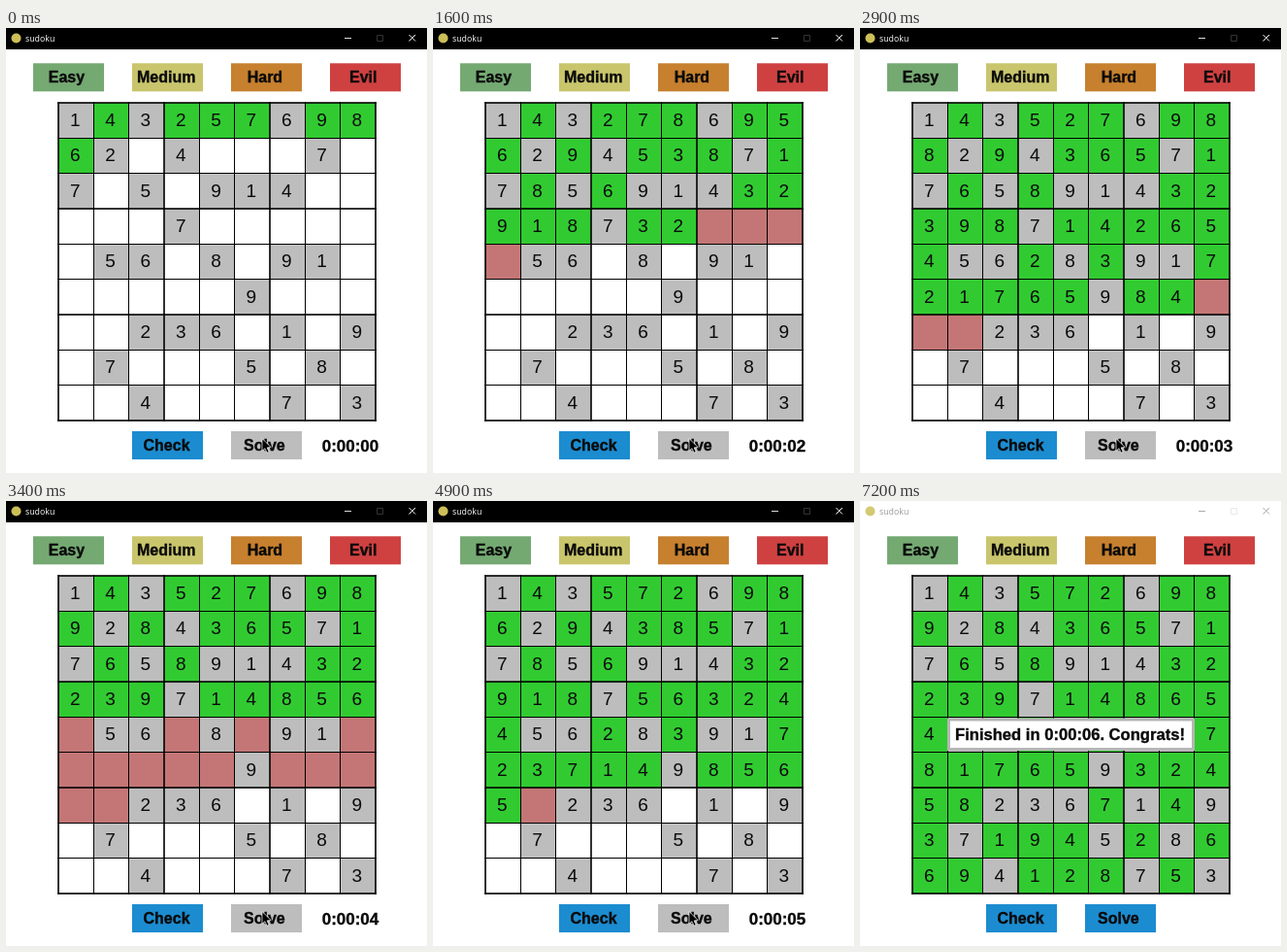
These frames come from a looping animation (434 px wide and 458 px high, 7.3 s). An HTML page:

```html
<!DOCTYPE html>
<html lang="en">
<head>
<meta charset="utf-8">
<title>sudoku</title>
<style>
  html, body { margin: 0; width: 100%; height: 100%; overflow: hidden; background: #fff; }
  svg { display: block; width: 434px; height: 458px; }
  text { font-family: "Liberation Sans", Arial, sans-serif; fill: #0a0a0a; }
  .bold { font-weight: bold; font-size: 16px; stroke: #0a0a0a; stroke-width: 0.35px; }
  .digit { font-size: 19px; text-anchor: middle; }
  .caption { font: 8.8px "Open Sans", sans-serif; }
</style>
</head>
<body>
<svg id="stage" viewBox="0 0 434 458"></svg>
<script>
const LOOP = 7300, TICK = 100, SOLVED = 6100, BLUR = 6600;
const CLOCK_LEAD = 850;
const LEFT = 54, TOP = 77, SIZE = 327, CELL = SIZE / 9;
const GREY = "#bdbdbd", GREEN = "#31cb31", RED = "#c47676", BLUE = "#1c8cd0";

const PUZZLE =
  "1.3...6.." + ".2.4...7." + "7.5.914.." +
  "...7....." + ".56.8.91." + ".....9..." +
  "..236.1.9" + ".7...5.8." + "..4...7.3";

// Backtracking solver; "-" marks a cell that was filled and then cleared.
const cells = [...PUZZLE], log = [];
const row = i => Math.floor(i / 9);
const col = i => i % 9;
const box = i => Math.floor(row(i) / 3) * 3 + Math.floor(col(i) / 3);
const sees = (a, b) => row(a) === row(b) || col(a) === col(b) || box(a) === box(b);
const fits = (i, d) => !cells.some((v, j) => v === d && sees(i, j));

function put(i, value) {
  cells[i] = value;
  log.push(cells.join(""));
}

function solve(i) {
  while (i < 81 && PUZZLE[i] !== ".") i++;
  if (i === 81) return true;
  for (const d of "123456789") {
    if (!fits(i, d)) continue;
    put(i, d);
    if (solve(i + 1)) return true;
    put(i, "-");
  }
  return false;
}
solve(0);

// Moments at which the search reaches a given position.
const CUES = [
  [0, "143257698" + "62.4"],
  [800, "143257698" + "829436571" + "765891432" + "98172----" + "-56"],
  [2200, "143527698" + "629438571" + "785691432" + "498716325" + "356284917" + "2--"],
  [3400, "143527698" + "928436571" + "765891432" + "239714856" + "-56-8-91-" + "-----9---" + "--236"],
  [4200, "143572698" + "629438571" + "785-914--"],
  [5600, "143572698" + "829436571" + "765891432" + "981743256" + "-56-8-91-" + "-----9---" + "--236"]
];
const keys = [];
let from = 0;
for (const [time, start] of CUES) {
  from = log.findIndex((s, i) => i >= from && s.startsWith(start));
  keys.push([time, from]);
}
keys.push([SOLVED, log.length - 1]);

function boardAt(t) {
  if (t >= SOLVED) return log[log.length - 1];
  const k = keys.findIndex(([time]) => time > t);
  const [t0, s0] = keys[k - 1], [t1, s1] = keys[k];
  return log[Math.round(s0 + (s1 - s0) * (t - t0) / (t1 - t0))];
}

const stage = document.getElementById("stage");
function add(tag, attrs, content = "", parent = stage) {
  const el = document.createElementNS("http://www.w3.org/2000/svg", tag);
  for (const name in attrs) el.setAttribute(name, attrs[name]);
  el.textContent = content;
  parent.appendChild(el);
  return el;
}
const rect = (x, y, width, height, fill, parent) =>
  add("rect", { x, y, width, height, fill }, "", parent);
const show = (el, on) => el.setAttribute("visibility", on ? "visible" : "hidden");

// Title bar
rect(0, 0, 434, 458, "#fff");
const bar = rect(0, 0, 434, 22, "#000");
const icon = add("circle", { cx: 10.5, cy: 10.5, r: 5, fill: "#cdbf58" });
const caption = add("text", { x: 20, y: 14, class: "caption" }, "sudoku");
const line = d => add("path", { d, fill: "none", "stroke-width": 1 });
const minimise = line("M349 10.5h7");
const maximise = line("M382.5 7.5h6v6h-6z");
const close = line("M415.5 7l6.5 6.5m0-6.5l-6.5 6.5");

function paintBar(active) {
  bar.setAttribute("fill", active ? "#000" : "#fff");
  icon.setAttribute("opacity", active ? 1 : 0.85);
  caption.style.fill = active ? "#fff" : "#999";
  minimise.setAttribute("stroke", active ? "#ddd" : "#aaa");
  maximise.setAttribute("stroke", active ? "#333" : "#e8e8e8");
  close.setAttribute("stroke", active ? "#fff" : "#aaa");
}

// Buttons
function button(x, y, fill, label, textX) {
  const face = rect(x, y, 73, 29, fill);
  add("text", { x: textX, y: y + 20, class: "bold" }, label);
  return face;
}
button(28, 36.3, "#74a972", "Easy", 43.8);
button(130, 36.3, "#c9c56c", "Medium", 135);
button(232, 36.3, "#c6802e", "Hard", 248.7);
button(334, 36.3, "#cf4141", "Evil", 354);
button(130, 415, BLUE, "Check", 141.5);
const solveFace = button(232, 415, GREY, "Solve", 245);
const clock = add("text", { x: 325.7, y: 436.3, class: "bold", style: "font-size:17px" });

// Board
const faces = [], digits = [];
for (let i = 0; i < 81; i++) {
  const x = LEFT + col(i) * CELL, y = TOP + row(i) * CELL;
  faces.push(rect(x, y, CELL, CELL, "#fff"));
  digits.push(add("text", { x: x + 17.2, y: y + 24, class: "digit" }));
}
for (let n = 0; n < 10; n++) {
  const thin = n % 3 > 0, w = thin ? 1 : 1.6;
  const edge = start => thin ? Math.floor(start + n * CELL) : start + n * CELL - w / 2;
  rect(edge(LEFT), TOP - 0.8, w, SIZE + 1.6, "#000");
  rect(LEFT - 0.8, edge(TOP), SIZE + 1.6, w, "#000");
}

const cursor = add("path", {
  d: "M264 422.5v12.8l3-2.6 2 4.6 2.2-1-2-4.4 4-.4z",
  fill: "#000", stroke: "#fff", "stroke-width": 0.7
});

const notice = add("g", {});
rect(90, 223.5, 255, 33.5, "#b6b6b6", notice);
rect(93, 226.5, 249, 27.5, "#fff", notice);
add("text", { x: 98, y: 245.8, class: "bold", style: "font-size:16.6px" },
  "Finished in 0:00:06. Congrats!", notice);

function draw(t) {
  const board = boardAt(t), solved = t >= SOLVED;
  for (let i = 0; i < 81; i++) {
    const v = board[i], filled = v >= "1";
    const fill = PUZZLE[i] !== "." ? GREY : filled ? GREEN : v === "-" ? RED : "#fff";
    faces[i].setAttribute("fill", fill);
    digits[i].textContent = filled ? v : "";
  }
  clock.textContent = "0:00:0" + Math.floor((t + CLOCK_LEAD) / 1000);
  show(clock, !solved);
  show(notice, solved);
  show(cursor, t < BLUR);
  solveFace.setAttribute("fill", solved ? BLUE : GREY);
  paintBar(t < BLUR);
}

const begin = performance.now();
let shown = -1;
function frame() {
  const t = Math.floor(((performance.now() - begin) % LOOP) / TICK) * TICK;
  if (t !== shown) draw(shown = t);
  requestAnimationFrame(frame);
}
frame();
</script>
</body>
</html>
```
